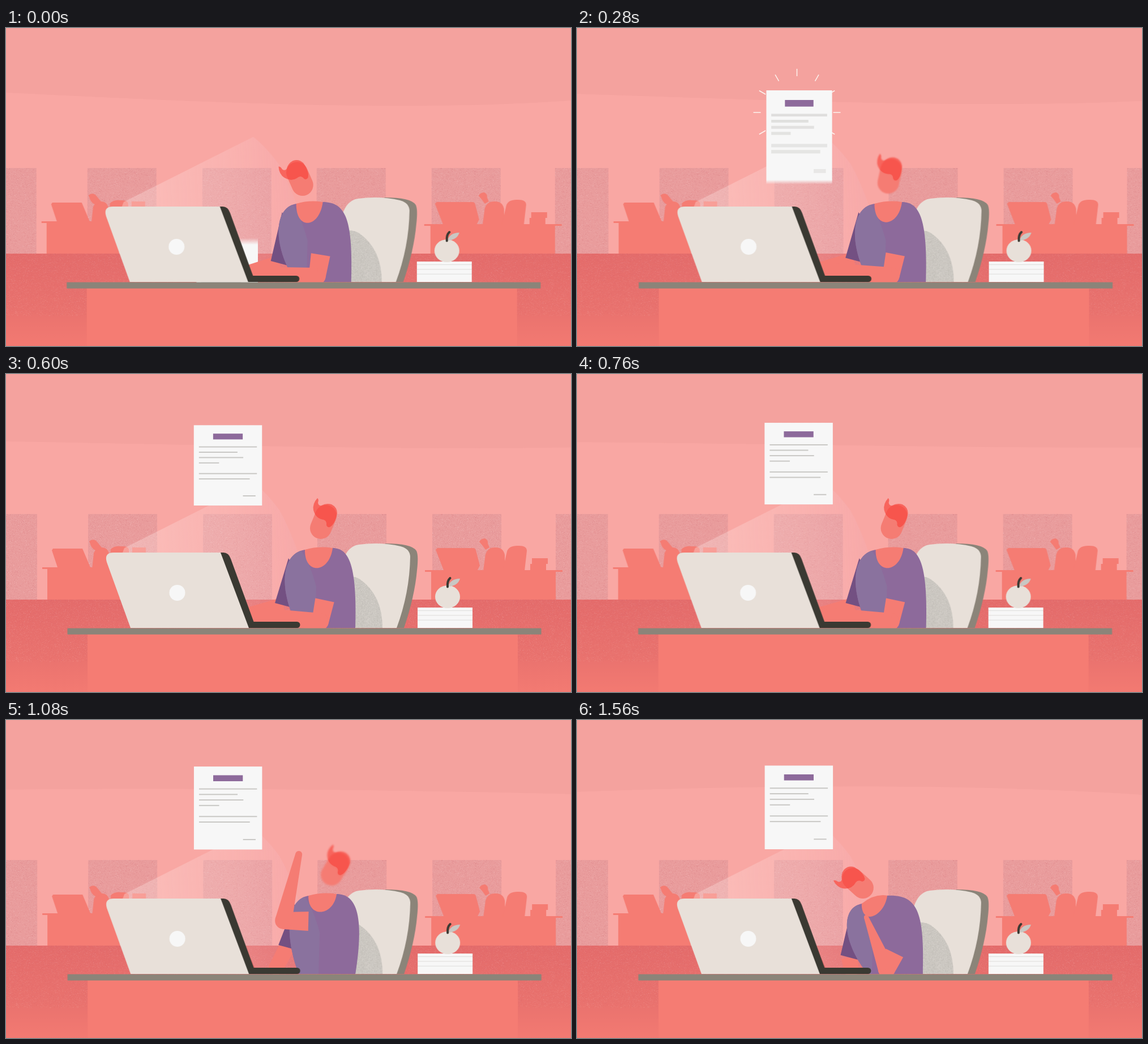
Recreate the animation shown at these times as an HTML page with a canvas. Size 998 px wide and 561 px high, loop 1.6 s.

```html
<!DOCTYPE html>
<html lang="en">
<head>
<meta charset="utf-8">
<title>At the desk</title>
<style>
html, body { margin: 0; width: 100%; height: 100%; overflow: hidden; background: #f9a7a3; }
canvas { display: block; width: 998px; height: 561px; }
</style>
</head>
<body>
<canvas id="stage" width="998" height="561"></canvas>
<script>
const W = 998, H = 561, LOOP = 1600, STEP = 40, PAD = 10;
const SKIN = '#f57c73', CREAM = '#e8e0d9', DARK = '#3a3932', GREY = '#8b8479', PAPER = '#f7f7f7';
const SHIRT = '#8d6a9b', SHIRT_LIGHT = '#8a729e', SHIRT_DARK = '#735082';
const stage = document.getElementById('stage').getContext('2d');
let g = stage;

const smooth = p => p * p * (3 - 2 * p);
const lerp = (a, b, p) => a + (b - a) * p;

function shape(d, color) {
  g.fillStyle = color;
  g.fill(new Path2D(d));
}

function rect(x, y, w, h, color) {
  g.fillStyle = color;
  g.fillRect(x, y, w, h);
}

function oval(x, y, rx, ry, color) {
  g.beginPath();
  g.ellipse(x, y, rx, ry, 0, 0, 7);
  g.fillStyle = color;
  g.fill();
}

// tapered limb with a flat start and a round end
function limb([x0, y0], r0, [x1, y1], r1) {
  const len = Math.hypot(x1 - x0, y1 - y0);
  const nx = (y0 - y1) / len, ny = (x1 - x0) / len;
  shape(`M${x0 + nx * r0} ${y0 + ny * r0}L${x1 + nx * r1} ${y1 + ny * r1}
    L${x1 - nx * r1} ${y1 - ny * r1}L${x0 - nx * r0} ${y0 - ny * r0}Z`, SKIN);
  oval(x1, y1, r1, r1, SKIN);
}

function gradient(x0, y0, x1, y1, ...stops) {
  const grad = g.createLinearGradient(x0, y0, x1, y1);
  stops.forEach(([at, color]) => grad.addColorStop(at, color));
  return grad;
}

let seed = 7;
function random() {
  seed = (seed * 16807) % 2147483647;
  return seed / 2147483647;
}

function grain(x, y, w, h, strength) {
  for (let n = w * h * 0.2; n > 0; n--) {
    const tone = random() < 0.5 ? '255,235,235' : '190,80,95';
    rect(x + Math.floor(random() * w), y + Math.floor(random() * h), 1, 1, `rgba(${tone},${strength})`);
  }
}

function layer(draw) {
  const canvas = document.createElement('canvas');
  canvas.width = W + 2 * PAD;
  canvas.height = H;
  g = canvas.getContext('2d');
  g.translate(PAD, 0);
  draw();
  g = stage;
  return canvas;
}

function pane(x, w) {
  rect(x, 247, w, 151, '#e99c9c');
  grain(x, 247, w, 151, 0.14);
}

const office = layer(() => {
  for (let i = 0; i < 4; i++) pane(Math.round(144 + i * 202.5), 122);
  pane(-PAD, PAD + 54);
  pane(970, W + PAD - 970);
  rect(-PAD, 398, W + 2 * PAD, H - 398,
    gradient(0, 398, 0, H, [0, '#e46c6b'], [0.6, '#e9726e'], [1, '#f37a72']));
  grain(-PAD, 398, W + 2 * PAD, 110, 0.1);

  // left colleague
  shape('M82 308H134L148 341H200V398H72V344H63V341H90L80 311Z', SKIN);
  shape('M151 345L154 316Q158 306 168 306Q179 306 181 318V345Z', SKIN);
  shape('M181 345L184 309Q190 303 202 304Q216 303 216 310V345Z', SKIN);
  shape('M146 295Q152 290 158 294L168 306L160 312Q152 310 149 303Z', SKIN);
  rect(222, 306, 24, 20, SKIN);

  // right colleague
  shape('M761 307H824Q828 307 829 311L836 338L832 346H982V349H970V398H750V349H739V346H772L758 310Z', SKIN);
  shape('M842 347L846 318Q850 306 862 306Q877 305 880 319V347Z', SKIN);
  shape('M876 347L884 313Q887 303 902 303Q919 302 919 312L915 347Z', SKIN);
  shape('M835 296Q838 290 845 290Q851 293 850 299L853 306L846 310L841 303Z', SKIN);
  rect(928, 325, 28, 10, SKIN);
  rect(925, 335, 28, 12, SKIN);

  // projected light
  shape('M208 307L437 192Q458 208 482 240Q500 272 516 318L520 440H440L380 315H205Z',
    gradient(230, 300, 520, 285, [0, 'rgba(255,235,232,.32)'], [0.6, 'rgba(255,220,222,.22)'], [1, 'rgba(240,190,210,.12)']));
});

const chair = layer(() => {
  shape('M668 299Q716 299 724 312Q728 320 725 346Q721 392 702 448H684L700 320Z', GREY);
  shape('M594 330Q602 304 622 301Q662 296 696 304Q712 308 713 322Q712 386 689 448H600Z', CREAM);
  const shade = new Path2D('M596 358Q612 355 624 362Q664 390 664 448H596Z');
  g.save();
  g.clip(shade);
  rect(596, 355, 70, 95, '#cbc7c1');
  for (let i = 0; i < 1500; i++)
    rect(596 + random() * 69, 356 + random() * 93, 1, 1, random() < 0.5 ? '#bfbbb5' : '#d9d4ce');
  g.restore();
});

const desk = layer(() => {
  shape('M189 315H380L429 448H219L177 332Q172 315 189 315Z', CREAM);
  shape('M378 315H383Q392 315 396 326L436.5 437H513A5.5 5.5 0 0 1 513 448H428Z', DARK);
  oval(301.5, 386, 14, 14, PAPER);
  rect(726, 412, 97, 36, PAPER);
  for (let y = 417; y < 436; y += 8.3) rect(726, y, 97, 1, '#dedddb');
  oval(779, 393, 22, 20, CREAM);
  shape('M780 375Q784 361 801 361Q797 374 780 375Z', '#c9c7c3');
  g.strokeStyle = DARK;
  g.lineWidth = 4;
  g.lineCap = 'round';
  g.stroke(new Path2D('M779 375.5Q778 365 783.5 360'));
  rect(143, 458, 760, H - 458, SKIN);
  rect(107.5, 448.5, 837, 11, GREY);
});

function drawCeiling(p) {
  rect(0, 0, W, H, '#f9a7a3');
  shape(`M0 0H${W}V${128 + 4 * p}C700 ${149 - 38 * p} 330 ${130 - 16 * p} 0 ${114 + 13 * p}Z`, '#f4a29e');
}

function drawRays(t) {
  const near = 64 + 0.2 * (t - 280);
  const far = Math.min(100, 77 + 0.145 * (t - 280));
  if (t < 200 || near >= far) return;
  g.strokeStyle = '#fdf3ee';
  g.lineWidth = 1.5;
  g.beginPath();
  for (let a = 0; a < 12; a++) {
    const c = Math.cos(a * Math.PI / 6), s = Math.sin(a * Math.PI / 6);
    g.moveTo(387 + c * near, 149 + s * near);
    g.lineTo(387 + c * far, 149 + s * far);
  }
  g.stroke();
}

// widths of the text lines; 0 leaves a row empty
const LINES = [0.85, 0.565, 0.65, 0.295, 0, 0.85, 0.745];

function drawPage(t) {
  const rise = Math.max(0, 1 - t / 280);
  const stretch = Math.max(0, 1 - t / 440);
  const blur = Math.min(1, 1.6 * stretch ** 0.7);
  const top = 80 + 30 * Math.exp((280 - t) / 300) + 220 * rise ** 2;
  const h = 148 - 10 * Math.exp((440 - t) / 350) + 60 * stretch ** 0.7;
  const w = 120.5 - 12 * stretch, x = 391 - w / 2;
  const fadeTop = 6 * rise, fadeEnd = 5 * blur;
  const y0 = top - fadeTop, y1 = top + h + fadeEnd, size = y1 - y0;
  rect(x, y0, w, size, gradient(0, y0, 0, y1,
    [0, fadeTop ? 'rgba(247,247,247,0)' : PAPER], [2 * fadeTop / size, PAPER],
    [1 - 2 * fadeEnd / size, PAPER], [1, fadeEnd ? 'rgba(247,247,247,0)' : PAPER]));
  rect(x + w * 0.283, top + h * 0.105, w * 0.434, h * 0.072, SHIRT);

  const line = (from, width, v) => {
    const thick = 2 + blur * (2 + 5 * v);
    g.globalAlpha = Math.min(1, 2.4 / thick);
    rect(x + w * from, top + h * v - thick / 2, w * width, thick, '#c9c8c5');
  };
  LINES.forEach((width, row) => line(0.075, width, 0.27 + row * 0.0665));
  line(0.72, 0.185, 0.88);
  g.globalAlpha = 1;
}

// body: how far the neck leans, the back bulges and the collar sags; head: chin and tilt
const LEANING = { body: [-14, -6, 0], head: [524, 277, -25], cuff: [556, 400], elbow: [550, 438], hand: [430, 432, 11], farHand: [430, 431] };
const TYPING = { body: [0, 0, 0], head: [555, 272, 21], cuff: [562, 399], elbow: [554, 437], hand: [430, 424, 13], farHand: [430, 424] };
const ARM_UP = { body: [6, 14, 0], head: [574, 273, 30], cuff: [533, 355], elbow: [489, 354], hand: [516, 237, 6], farHand: [476, 437] };
const SLUMPED = { body: [-25, -6, 14], head: [500.5, 299, -52], cuff: [571, 411], elbow: [563, 440], hand: [511, 356, 4], farHand: [484, 440] };
const RESTING = { ...SLUMPED, head: [504, 296, -49], cuff: [560, 411], elbow: [546, 440], hand: [510, 348, 4] };
const MOVES = [[0, LEANING], [400, TYPING], [900, TYPING], [1080, ARM_UP], [1260, SLUMPED], [1520, RESTING], [LOOP, RESTING]];

function poseAt(t) {
  const next = Math.max(1, MOVES.findIndex(([at]) => at > t));
  const [t0, from] = MOVES[next - 1], [t1, to] = MOVES[next];
  const p = smooth(Math.max(0, (t - t0) / (t1 - t0)));
  const pose = {};
  for (const name in from) pose[name] = from[name].map((v, i) => lerp(v, to[name][i], p));
  return pose;
}

function drawBody({ body: [lean, back, sag], cuff, elbow, hand, farHand }) {
  const side = (lean + back) / 2, hip = Math.min(0, back);
  const lx = 527 + lean, ly = 310 + sag, rx = 576 + 1.15 * lean, ry = 307 + 0.2 * sag;

  const fx = 489 + 0.6 * side, fy = 408 - 0.7 * side;
  limb([fx, fy], 14, farHand, 13);
  shape(`M${498 + side} ${325 + sag}L${fx - 15} ${fy - 4}L${fx + 15} ${fy + 4}L${fx + 30} ${fy - 45}Z`, SHIRT_DARK);

  const torso = `M${lx} ${ly}L${rx} ${ry}C${606 + 0.7 * back} 307 ${619 + back} 340 ${616 + hip} 448
    H${516 + hip / 2}C${485 + side} 395 ${478 + side} ${318 + sag} ${lx} ${ly}Z`;
  shape(torso, SHIRT);
  g.save();
  g.clip(new Path2D(torso));
  shape(`M${lx - 8} ${ly}Q${lx + 8} ${ly + 20} ${547 + lean} 375L${545 + lean} 448H450V${ly}Z`, SHIRT_LIGHT);
  g.restore();

  const depth = 45 - 0.35 * back - 0.6 * sag;
  shape(`M${lx} ${ly}Q${(lx + rx) / 2} ${ry - 4} ${rx} ${ry}
    C${rx - 6} ${ry + depth} ${lx - 1} ${ly + depth} ${lx} ${ly}Z`, SKIN);

  limb(cuff, 17, elbow, 15);
  limb(elbow, 15, hand, hand[2]);
}

const FACE = new Path2D('M0 0L9 -22');
const HAIR = new Path2D('M-6 -53Q-15 -43 -13 -32Q-9 -17 5 -15Q11 -13 10 -6Q11 -1 16 -2Q25 -7 29 -26Q29 -37 19 -42Q10 -45 1 -40Q-4 -39 -5 -45Q-3 -51 -6 -53Z');

function drawHead([x, y, turn], blur) {
  g.save();
  g.translate(x, y);
  g.rotate((turn - 21) * Math.PI / 180);
  if (blur > 0.3) g.filter = `blur(${blur}px)`;
  g.lineCap = 'round';
  g.lineWidth = 38;
  g.strokeStyle = SKIN;
  g.stroke(FACE);
  g.fillStyle = '#f8655d';
  g.fill(HAIR);
  g.clip(HAIR);
  g.strokeStyle = '#f7554d';
  g.stroke(FACE);
  g.restore();
}

function render(t) {
  const sway = 1 - 1.3 * Math.exp(-t / 700) * Math.cos(t * Math.PI / 400);
  const pose = poseAt(t), later = poseAt(t + 20);
  const speed = Math.hypot(later.head[0] - pose.head[0], later.head[1] - pose.head[1]);
  drawCeiling(t / LOOP);
  g.save();
  g.translate(sway, 0);
  g.drawImage(office, -PAD, 0);
  drawRays(t);
  drawPage(t);
  g.drawImage(chair, -PAD, 0);
  drawBody(pose);
  drawHead(pose.head, Math.min(1.5, speed * 0.6));
  g.drawImage(desk, -PAD, 0);
  g.restore();
}

function tick() {
  render(Math.floor(performance.now() % LOOP / STEP) * STEP);
  requestAnimationFrame(tick);
}
tick();
</script>
</body>
</html>
```
